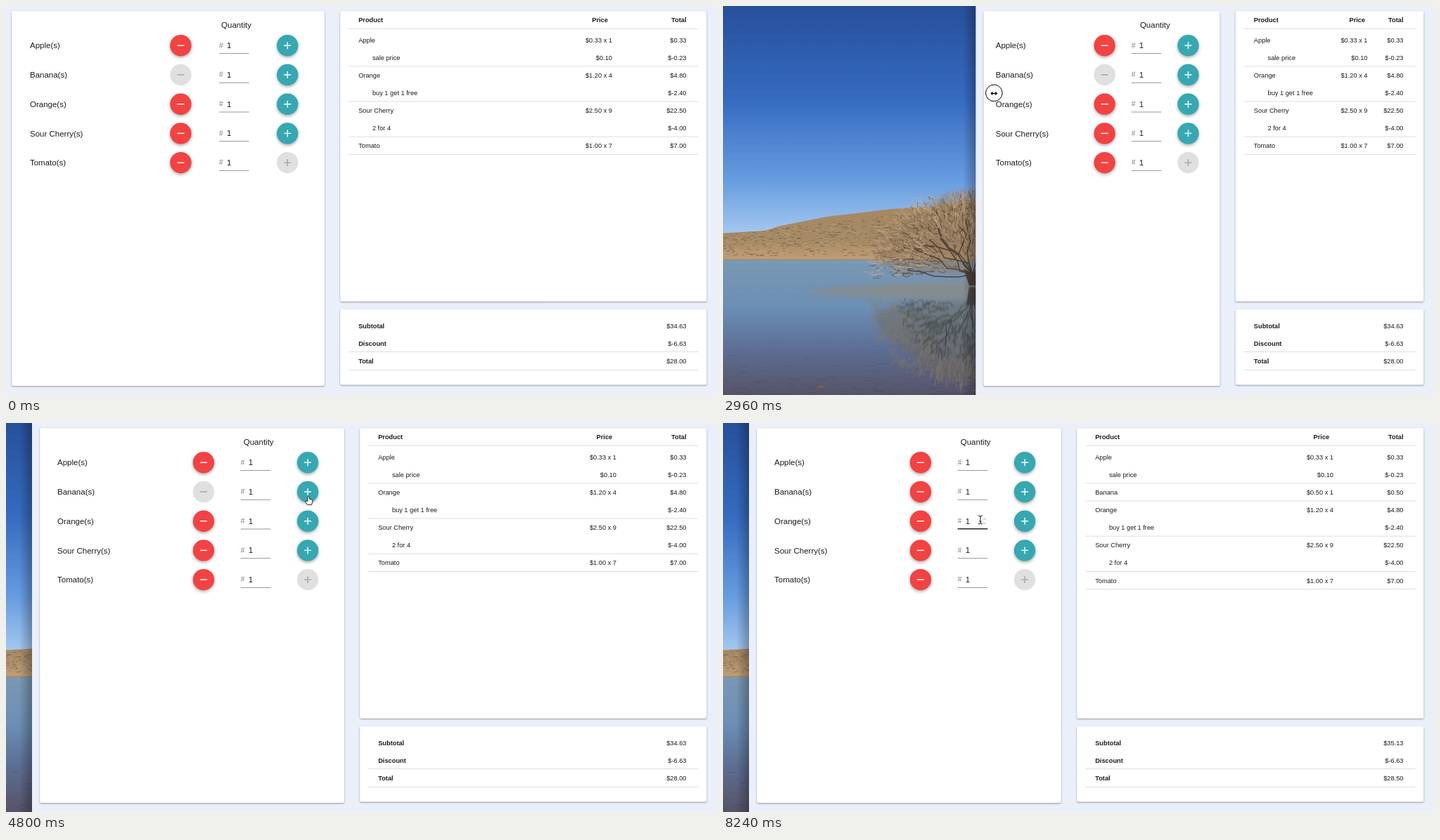
Animation of 1011x554 px, one loop 8.64 s. Source, as an HTML page:

```html
<!DOCTYPE html>
<html lang="en">
<head>
<meta charset="utf-8">
<title>Cart</title>
<style>
html, body { margin: 0; width: 100%; height: 100%; overflow: hidden; background: #fff; }
svg { display: block; width: 1011px; height: 554px; }
text { font-family: "Liberation Sans", Arial, sans-serif; font-size: 9.25px; fill: #1c1c1c; }
.big { font-size: 11.5px; }
.bold { font-weight: bold; }
.end { text-anchor: end; }
.mid { text-anchor: middle; }
.hash { font-size: 10.2px; fill: #808080; }
.card { fill: #fff; filter: drop-shadow(0 1.4px .8px rgba(0,0,0,.38)); }
.raised { filter: drop-shadow(0 2px 2px rgba(0,0,0,.32)); }
.rule { stroke: #dedede; }
</style>
</head>
<body>
<svg viewBox="0 0 1011 554">
  <defs>
    <linearGradient id="sky" x2="0" y2="1">
      <stop offset="0" stop-color="#27509b"/><stop offset=".4" stop-color="#356bc0"/>
      <stop offset=".75" stop-color="#669ce0"/><stop offset="1" stop-color="#a9cbf0"/>
    </linearGradient>
    <linearGradient id="lake" x2="0" y2="1">
      <stop offset="0" stop-color="#7a98b4"/><stop offset=".35" stop-color="#6c8fb5"/>
      <stop offset=".65" stop-color="#5d6f95"/><stop offset="1" stop-color="#575368"/>
    </linearGradient>
    <linearGradient id="hill" x2="0" y2="1">
      <stop offset="0" stop-color="#a58861"/><stop offset=".75" stop-color="#a68a66"/>
      <stop offset="1" stop-color="#c2a077"/>
    </linearGradient>
    <linearGradient id="shade">
      <stop offset="0" stop-opacity="0"/><stop offset="1" stop-opacity=".28"/>
    </linearGradient>
    <filter id="soft"><feGaussianBlur stdDeviation="4"/></filter>
    <filter id="ripply"><feGaussianBlur stdDeviation=".5 1.4"/></filter>
  </defs>
  <g id="photo"></g>
  <g id="scene"></g>
</svg>
<script>
const LOOP = 8640, STEP = 80;
const photo = document.getElementById('photo');
const scene = document.getElementById('scene');

// ---- Landscape behind the window ----
let seed = 7;
const rnd = () => (seed = seed * 16807 % 2147483647) / 2147483647;
const n1 = v => v.toFixed(1);

// Short crooked strokes spread over the crown between two relative radii
function twigs(count, from, to, size) {
  let d = '';
  const bend = () => n1((rnd() - .5) * size);
  for (let i = 0; i < count; i++) {
    const a = Math.PI * (.96 + rnd() * 1.08), r = from + (to - from) * Math.sqrt(rnd());
    const x = 354 + Math.cos(a) * 140 * r, y = 374 + Math.sin(a) * 110 * r;
    d += `M${n1(x)} ${n1(y)}q${bend()} ${bend()} ${n1(Math.cos(a) * size * rnd())} ${n1(Math.sin(a) * size * rnd())}`;
  }
  return d;
}

// Crooked limbs running outwards from the trunk
function limbs(count) {
  let d = '';
  for (let i = 0; i < count; i++) {
    let x = 355, y = 382;
    const a = Math.PI * (1.04 + .92 * (i + rnd()) / count);
    d += `M${x} ${y}`;
    for (let k = 0; k < 5; k++) {
      const turn = a + (rnd() - .5) * 1.3;
      x += Math.cos(turn) * 19;
      y += Math.sin(turn) * 16;
      d += `L${n1(x)} ${n1(y)}`;
    }
  }
  return d;
}

function drawPhoto() {
  const line = (d, c, w, o = 1) =>
    `<path d="${d}" fill="none" stroke="${c}" stroke-width="${w}" opacity="${o}"/>`;
  const scrub = count => {
    let d = '';
    for (let i = 0; i < count; i++) {
      const x = rnd() * 470, top = 326 - x * .115;
      d += `M${n1(x)} ${n1(top + rnd() * (356 - top))}h${n1(2 + rnd() * 4)}`;
    }
    return d;
  };
  let waves = '';
  for (let i = 0; i < 170; i++)
    waves += `M${n1(rnd() * 470)} ${n1(554 - 75 * rnd() * rnd())}h${n1(4 + rnd() * 10)}`;
  const crown = 'M214 362Q224 330 262 306Q288 284 318 268Q350 258 386 266Q440 282 482 342L490 368Q430 384 355 380Q280 380 240 372Z';
  const tree =
    `<path d="${crown}" fill="#93795f" opacity=".6" filter="url(#soft)"/>` +
    line(twigs(420, .1, .8, 13), '#594737', 1, .75) +
    line(limbs(13), '#43362c', 1.5, .85) +
    line(twigs(620, .3, 1.02, 13), '#c3aa8c', .9, .85) +
    line(twigs(240, .3, 1, 11), '#6c5642', .8, .8) +
    '<path d="M342 374L350 398H363L366 374L357 382Z" fill="#4d4136"/>';
  const mirror =
    `<path d="${crown}" fill="#6f6757" opacity=".6" filter="url(#soft)"/>` +
    line(twigs(420, .5, 1.02, 15), '#8b7b5d', 1.2, .7) +
    line(twigs(420, 0, .7, 15), '#403f34', 1.4, .75) +
    line(limbs(9), '#36352d', 1.6, .7) +
    '<path d="M346 374L350 400H363L364 374Z" fill="#3d3d34"/>';
  photo.innerHTML =
    '<rect width="520" height="330" fill="url(#sky)"/>' +
    '<path d="M0 323.5L60 320L80 313.5L148 300L240 289L300 285L393 267.5L520 252V363H0Z" fill="url(#hill)"/>' +
    line(scrub(650), '#6b563f', 1, .55) + line(scrub(450), '#c6aa82', 1, .5) +
    '<rect y="361" width="520" height="193" fill="url(#lake)"/>' +
    '<path d="M0 360H230L520 357V362H0Z" fill="#a88c68" opacity=".7"/>' +
    '<path d="M110 408Q220 390 520 390V420Q300 424 110 408Z" fill="#918a7c" opacity=".65" filter="url(#soft)"/>' +
    `<g transform="matrix(1 0 0 -1 0 800)" opacity=".85" filter="url(#ripply)">${mirror}</g>` + tree +
    line(waves, '#403d50', .8, .35) +
    '<ellipse cx="139" cy="542" rx="5" ry="1.6" fill="#84623c"/><ellipse cx="358" cy="547" rx="4" ry="1.6" fill="#84623c"/>';
}

// ---- Timeline ----
function track(keys, t) {
  let i = 0;
  while (i < keys.length - 2 && t >= keys[i + 1][0]) i++;
  const a = keys[i], b = keys[i + 1];
  const k = Math.min(1, Math.max(0, (t - a[0]) / (b[0] - a[0])));
  return a.slice(1).map((v, j) => v + (b[j + 1] - v) * k);
}
const edgeKeys = [[1920, -3], [2080, 12], [2160, 58], [2320, 130], [2640, 316], [3120, 381],
  [3280, 394], [3360, 398], [3840, 130], [4160, 37]];
const pointerKeys = [[160, 398, 14], [320, 7, 50], [560, 8, 51], [800, 8, 72], [1040, 3, 70],
  [1600, 3, 70], [1760, 4, 77], [1920, 4, 77], [2080, 90.2, 70.8], [2320, 160, 85], [2640, 346.2, 116.5],
  [3280, 424.5, 131.3], [3360, 430, 131], [3840, 165, 118], [4160, 55, 112], [4720, 428, 102],
  [4800, 430, 104], [5200, 430, 104], [5600, 281, 139], [6480, 281, 139], [6640, 291, 147],
  [6800, 334, 150], [7040, 430, 143], [7600, 430, 143], [7840, 362, 138], [8000, 362, 138], [8080, 366, 138]];
const looks = [[0, ''], [160, 'arrow'], [320, 'resize'], [4240, 'arrow'], [4640, 'hand'],
  [5280, 'arrow'], [5520, 'hand'], [6720, 'arrow'], [6960, 'hand'], [7680, 'arrow'], [7760, 'beam']];
const lessOrange = [5680, 5840, 6000, 6240], moreOrange = [7200, 7360, 7440, 7600];
const passed = (list, t) => list.filter(v => t >= v).length;
const within = (t, a, b) => t >= a && t < b;

// ---- Drawing helpers ----
const money = v => '$' + v.toFixed(2);
const text = (x, y, s, cls = '') => `<text x="${x}" y="${y}" class="${cls}">${s}</text>`;
const rule = (x, y) => `<path class="rule" d="M${x} ${y}H984.5"/>`;
const card = (x, y, r, b) => `<rect class="card" x="${x}" y="${y}" width="${r - x}" height="${b - y}" rx="2"/>`;

function button(x, y, on, color, plus) {
  const cls = on ? ' class="raised"' : '';
  return `<circle cx="${x}" cy="${y}" r="15.2" fill="${on ? color : '#e0e0e0'}"${cls}/>` +
    `<path d="M${x - 5} ${y}h10${plus ? `M${x} ${y - 5}v10` : ''}" stroke="${on ? '#fff' : '#a3a3a3'}" stroke-width="1.4"/>`;
}

function picker(L, t, banana, orange) {
  const label = 36.9 + .9765 * L, minus = 250.9 + .812 * L, input = 305.3 + .7665 * L, plus = 402.4 + .721 * L;
  const focus = t >= 7840;
  let s = text(329.9 + .7915 * L, 30.6, 'Quantity', 'big mid');
  ['Apple', 'Banana', 'Orange', 'Sour Cherry', 'Tomato'].forEach((name, i) => {
    const y = 56.3 + 41.7 * i, active = focus && i === 2;
    if (i === 3 && within(t, 6400, 7200))
      s += `<rect x="${label}" y="${y - 6.3}" width="75.8" height="13" fill="#b3d7fd"/>`;
    s += text(label, y + 4.1, name + '(s)', 'big') +
      button(minus, y, i === 1 ? banana : i === 2 ? orange : true, '#f34242', false) +
      button(plus, y, i < 4, '#36a8b1', true) +
      text(input, y + 3.3, '#', 'hash') + text(input + 11, y + 3.8, '1', 'big') +
      `<path d="M${input} ${y + (active ? 11 : 11.3)}h42.7" stroke="${active ? '#25252f' : '#949494'}" stroke-width="${active ? 1.6 : 1}"/>`;
    if (active)
      s += `<path d="M${input + 36} ${y - 2}l2 -2l2 2M${input + 36} ${y + 2}l2 2l2 -2" fill="none" stroke="#999" stroke-width=".9"/>`;
    if (active && t < 8240)
      s += `<path d="M${input + 18} ${y - 6.5}v13" stroke="#222"/>`;
  });
  return s;
}

function receipt(L, left, banana, orange) {
  const x = left + 26, price = 862.45 + .1505 * L, right = 967.5;
  const items = [['Apple', .33, 1, 'sale price', -.23, '$0.10'], ['Banana', .5, banana ? 1 : 0],
    ['Orange', 1.2, orange, 'buy 1 get 1 free', -1.2 * Math.floor(orange / 2)],
    ['Sour Cherry', 2.5, 9, '2 for 4', -4], ['Tomato', 1, 7]];
  let s = text(x, 23, 'Product', 'bold') + text(856.4 + .158 * L, 23, 'Price', 'bold end') +
    text(right, 23, 'Total', 'bold end') + rule(left + 12, 32.3);
  let y = 51.8, sum = 0, off = 0;
  for (const [name, each, count, deal, cut, now] of items) {
    if (!count) continue;
    sum += each * count;
    s += text(x, y, name) + text(price, y, `${money(each)} x ${count}`, 'end') +
      text(right, y, money(each * count), 'end');
    if (cut) {
      off += cut;
      y += 25;
      s += text(x + 19.7, y, deal) + text(price, y, now || '', 'end') + text(right, y, money(cut), 'end');
    }
    s += rule(left + 12, y + 9);
    y += 25.2;
  }
  [['Subtotal', sum, 458.7], ['Discount', off, 483.6], ['Total', sum + off, 509]].forEach(([name, v, at]) => {
    s += text(x, at, name, 'bold') + text(right, at, money(v), 'end');
  });
  return s + rule(left + 12, 492.5) + rule(left + 12, 518.4);
}

const shapes = {
  arrow: '<path d="M0 0V11L2.6 8.7L4.4 12.4L6.2 11.6L4.5 8H8Z" fill="#000" stroke="#fff" stroke-width=".8"/>',
  hand: '<path d="M-1.2 .6Q0 -1 1.2 .6V4.2Q2.6 3.6 3 4.8Q4.2 4.2 4.6 5.4Q6 5 6 6.6L5.2 10.2L4.4 12.4H-1.4L-4.4 8Q-4.6 6.2 -2.6 6.8L-1.2 8Z" fill="#fff" stroke="#111" stroke-width=".9"/>',
  beam: '<path d="M-3 -6Q0 -6 0 -4Q0 -6 3 -6M-3 6Q0 6 0 4Q0 6 3 6M0 -4V4M-1.5 2H1.5" fill="none" stroke="#111"/>',
  resize: '<circle r="11.8" fill="#fff" stroke="#000"/>' +
    '<path d="M-5 .6L-2 -2.2V-.2H2V-2.2L5 .6L2 3.4V1.4H-2V3.4Z"/>'
};

function pointer(t) {
  const kind = looks[passed(looks.map(v => v[0]), t) - 1][1];
  if (!kind) return '';
  const [x, y] = track(pointerKeys, t);
  return `<g transform="translate(${x} ${y})">${shapes[kind]}</g>`;
}

function render(t) {
  const [L] = track(edgeKeys, t);
  const blank = within(t, 2000, 2320) || within(t, 3200, 3440);
  let s = `<rect x="${L}" width="${1011 - L}" height="554" fill="${blank ? '#fefefe' : '#ebeff9'}"/>`;
  if (!blank) {
    const left = 477.3 + .7 * L, banana = t >= 5040;
    const orange = 4 - passed(lessOrange, t) + passed(moreOrange, t);
    s += `<rect x="${L - 18}" width="18" height="554" fill="url(#shade)"/>` +
      card(L + 11.2, 7.3, left - 22.3, 541) + card(left, 7.3, 996.3, 420.8) + card(left, 432, 996.3, 539.5) +
      picker(L, t, banana, orange > 0) + receipt(L, left, banana, orange);
  }
  scene.innerHTML = s + pointer(t);
}

drawPhoto();
let start = null, shown = -1;
function tick(now) {
  if (start === null) start = now;
  const t = Math.floor((now - start) % LOOP / STEP) * STEP;
  if (t !== shown) render(shown = t);
  requestAnimationFrame(tick);
}
render(0);
requestAnimationFrame(tick);
</script>
</body>
</html>
```
